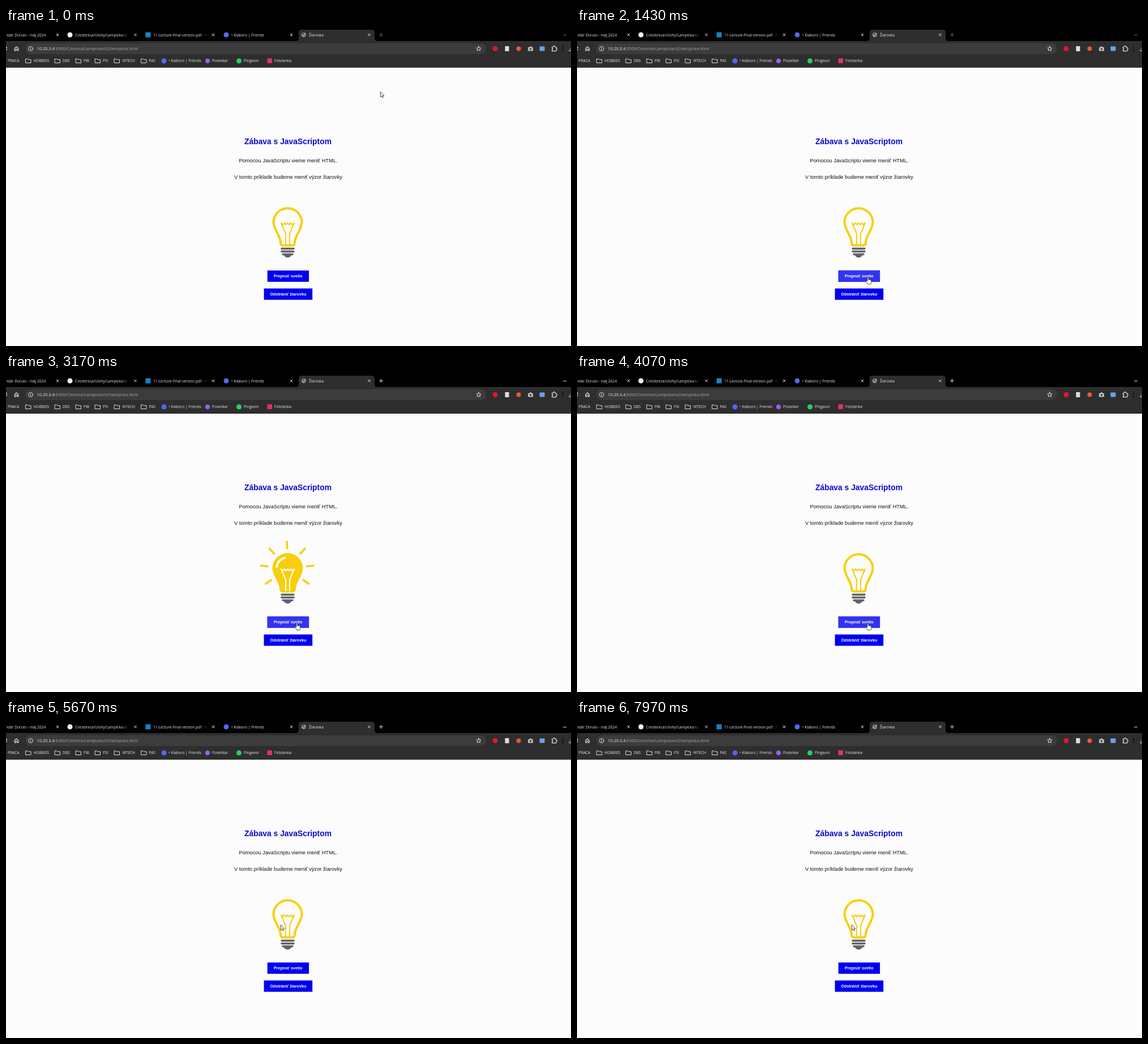
An HTML page that plays this animation: 998x561 px, repeating every 8 s.

```html
<!DOCTYPE html>
<html lang="sk">
<head>
<meta charset="utf-8">
<title>Žiarovka</title>
<style>
  html, body { margin: 0; width: 100%; height: 100%; overflow: hidden; background: #fcfcfd; }
  svg { display: block; }
  .ui { font: 6.6px "Open Sans", sans-serif; fill: #e6e6e6; }
  .url { font-size: 7.4px; fill: #a8a8a8; }
  .page { font: 9.28px "Liberation Sans", sans-serif; fill: #111; text-anchor: middle; }
  .title { font-size: 13.85px; font-weight: bold; fill: #0a0acb; }
  .button { font-size: 7.15px; font-weight: bold; fill: #fff; }
  .line { fill: none; stroke: #dedede; stroke-linecap: round; stroke-linejoin: round; }
  .glass { fill: none; stroke: #f8cf0c; stroke-width: 4; }
  .filament { fill: none; stroke: #f8cf0c; stroke-width: 2; stroke-linejoin: round; }
  .lit .glass { fill: #f8cf0c; }
  .lit .filament { stroke: #fff; }
  .rays { fill: none; stroke: #f8cf0c; stroke-width: 3.6; }

  .pointer, .arrow, .beam, .hand, .hover, .off, .lit, .focus { animation: 8s step-end infinite; }
  .pointer { animation-name: travel; }
  .arrow { animation-name: arrow; }
  .beam { animation-name: beam; }
  .hand, .hover { animation-name: over; }
  .off { animation-name: off; }
  .lit { animation-name: lit; }
  .focus { animation-name: focus; }

  @keyframes travel {
    0% { transform: translate(661px, 112px); }
    1.5% { transform: translate(661px, 112px); animation-timing-function: ease-in; }
    7.9% { transform: translate(583px, 263px); animation-timing-function: ease-out; }
    15.5% { transform: translate(514px, 439px); }
    54% { transform: translate(514px, 439px); animation-timing-function: ease-in-out; }
    62%, 100% { transform: translate(485px, 361px); }
  }
  @keyframes arrow {
    0%, 8.4%, 56.2%, 100% { opacity: 1; }
    7.6%, 13.6% { opacity: 0; }
  }
  @keyframes beam {
    0%, 8.4%, 100% { opacity: 0; }
    7.6% { opacity: 1; }
  }
  @keyframes over {
    0%, 56.2%, 100% { opacity: 0; }
    13.6% { opacity: 1; }
  }
  @keyframes off {
    0%, 40%, 100% { opacity: 1; }
    23% { opacity: 0; }
  }
  @keyframes lit {
    0%, 40%, 100% { opacity: 0; }
    23% { opacity: 1; }
  }
  @keyframes focus {
    0% { opacity: .45; }
    22%, 100% { opacity: 1; }
  }
</style>
</head>
<body>
<svg width="998" height="561" viewBox="0 0 998 561">
  <defs>
    <linearGradient id="fade"><stop stop-opacity="0"/><stop offset="1"/></linearGradient>
    <path id="close" class="line" d="M-2-2 2 2M2-2-2 2"/>
    <path id="folder" class="line" d="M-4.5-3.5h3.2l1.2 1.3h4.6v5.7h-9z"/>
    <path id="glass" d="M489 383.5H506Q509.5 383.5 510 379.5C509.5 366 521.5 358 522.5 343A25 25 0 1 0 472.5 343C473.5 358 485.500 366 485 379.5Q485.5 383.5 489 383.5Z"/>
    <path id="filament" d="M494 383V363L486 344l3.5 3 2.6-3 2.7 3 2.7-3 2.7 3 2.7-3 2.6 3 3.5-3L501 363V383"/>
    <path id="base" fill="#626267" d="M487 387.5h21a1.7 1.7 0 0 1 0 3.5h-21a1.7 1.7 0 0 1 0-3.5zm0 5h21a1.7 1.7 0 0 1 0 3.5h-21a1.7 1.7 0 0 1 0-3.5zm1 5h19q2 1.8-1 3.5h-2q-2 4-6.5 4t-6.5-4h-2q-3-1.7-1-3.5z"/>
  </defs>

  <rect width="998" height="561" fill="#fcfcfd"/>

  <g class="ui">
    <rect width="998" height="24" fill="#000"/>
    <path fill="#2e2e2e" d="M512 23q5 0 5-5V8q0-5 5-5H646q5 0 5 5V18q0 5 5 5z"/>
    <rect y="23" width="998" height="47" fill="#2e2e2e"/>
    <rect x="34" y="27" width="814" height="19" rx="9.5" fill="#3c3c3c"/>

    <text x="-1" y="14.5">ndár Dorulo - máj 2024</text>
    <circle cx="113" cy="12" r="4.5" fill="#f2f2f2"/>
    <text x="122" y="14.5">Cvicebnica/Ulohy/Lampicka/ul</text>
    <rect x="246.5" y="7.5" width="9" height="9" fill="#1683c6"/>
    <text x="260" y="14.5">11-Lecture-Final version.pdf - N</text>
    <path fill="url(#fade)" d="M203 4h15v16h-15z"/>
    <path fill="url(#fade)" d="M342 4h14v16h-14z"/>
    <path fill="#000" d="M218 4h5v16h-5zM356 4h6v16h-6z"/>
    <circle cx="389" cy="12" r="4.5" fill="#5865f2"/>
    <text x="398" y="14.5">• Klaboro | Friends</text>
    <circle cx="526" cy="12" r="4" fill="#9a9da1"/>
    <path fill="#55585c" d="M523 10.5q2-3 4-2.2l-1 2.2 1.5 1-2 2zM527 13l2.5-1q0 2.5-2.5 3.5z"/>
    <text x="535" y="14.5">Žiarovka</text>
    <use href="#close" x="91" y="12"/>
    <use href="#close" x="228.5" y="12"/>
    <use href="#close" x="366" y="12"/>
    <use href="#close" x="504" y="12"/>
    <use href="#close" x="641.5" y="12"/>
    <path class="line focus" d="M659.5 12h6M662.5 9v6M984.5 12.5h5"/>

    <path class="line" stroke-width="1.2" d="M0 33.5h1v2h-2M0 39q1-.5 1.3-1.5M15.2 36 18.5 33l3.3 3v4h-2v-2.7h-2.5V40h-2z"/>
    <circle class="line" cx="43.5" cy="36.5" r="3.8"/>
    <path class="line" d="M43.5 36v2.3M43.5 34.3v.1"/>
    <text class="url" x="54.5" y="39"><tspan fill="#f0f0f0">10.20.3.4</tspan>:8300/Cvicenia/Lampicka/v2/lampicka.html</text>
    <path class="line" d="m835 32.3 1.2 2.7 2.9.3-2.2 1.9.7 2.9-2.6-1.5-2.6 1.5.7-2.9-2.2-1.9 2.9-.3z"/>
    <circle cx="864" cy="36.5" r="4.5" fill="#e0182d"/>
    <rect x="881.5" y="32" width="7" height="9" fill="#dedede"/>
    <circle cx="905.5" cy="36.5" r="4" fill="#ea5933"/>
    <path fill="#b9b9b9" d="M922 34h2l1-1.5h3l1 1.5h2v6.5h-9z"/>
    <circle cx="926.5" cy="37" r="1.8" fill="#4b4b4b"/>
    <rect x="942.5" y="32.5" width="9" height="8" rx="1" fill="#6ba1ec"/>
    <path class="line" stroke-width="1.2" d="M964.5 33.5h2.2q0-1.8 1.5-1.8t1.5 1.8h2v2.2q1.7 0 1.7 1.4t-1.7 1.4v2.2h-7.2v-2.3q1.6 0 1.6-1.3t-1.6-1.3z"/>
    <path stroke="#111" stroke-width="1.5" d="M983.5 31.5v10"/>
    <path class="line" d="M998 40.5h-3v-2M996.5 36l1.5 1.5"/>

    <text x="3" y="60.3">PRACA</text>
    <use href="#folder" x="39.5" y="58"/><text x="48.5" y="60.3">HOBBIES</text>
    <use href="#folder" x="91" y="58"/><text x="100" y="60.3">DBS</text>
    <use href="#folder" x="128" y="58"/><text x="137" y="60.3">PIB</text>
    <use href="#folder" x="162" y="58"/><text x="171" y="60.3">PSI</text>
    <use href="#folder" x="196" y="58"/><text x="205.5" y="60.3">WTECH</text>
    <use href="#folder" x="243.5" y="58"/><text x="252.5" y="60.3">PAS</text>
    <circle cx="279" cy="58" r="4.5" fill="#5865f2"/><text x="287" y="60.3">• Klaboro | Friends</text>
    <circle cx="356" cy="58" r="4.2" fill="#a05cf5"/><text x="364" y="60.3">Posielkar</text>
    <circle cx="411.5" cy="58" r="4.5" fill="#28cf62"/><text x="420" y="60.3">Pingavor</text>
    <rect x="461.5" y="53.5" width="8.5" height="8.5" fill="#df2f78"/><text x="474" y="60.3">Fotolanka</text>
  </g>

  <g class="page">
    <text class="title" x="498" y="205">Zábava s JavaScriptom</text>
    <text x="498.5" y="236.8">Pomocou JavaScriptu vieme meniť HTML.</text>
    <text x="498.5" y="265.8">V tomto príklade budeme meniť výzor žiarovky</text>

    <g class="off">
      <use class="glass" href="#glass"/>
      <use class="filament" href="#filament"/>
      <use href="#base"/>
    </g>
    <g class="lit">
      <path class="rays" d="M496.5 294.5V309M464.5 307l10 11M529 307l-10 11M449 338l14.5 1.5M544.5 338 530 339.5M457.5 371l12-8.5M536 371l-12-8.5"/>
      <use class="glass" href="#glass"/>
      <path fill="none" stroke="#fff" stroke-width="3.5" d="M478 341.5Q479.5 327 494 324"/>
      <use class="filament" href="#filament"/>
      <use href="#base"/>
    </g>

    <path fill="#0000ee" d="M461.7 427.7h73.4v20.1h-73.4zM455.6 459.4h85.6v20.1h-85.6z"/>
    <path class="hover" fill="#3333f1" d="M461.7 427.7h73.4v20.1h-73.4z"/>
    <text class="button" x="498.3" y="440.3">Prepnúť svetlo</text>
    <text class="button" x="498.4" y="472.1">Odstrániť žiarovku</text>
  </g>

  <g class="pointer">
    <path class="arrow" fill="#fff" stroke="#222" stroke-width=".8" d="M.4.4v9.3l2.1-2 1.5 3.3 1.5-.7L4 7.2h2.9z"/>
    <path class="beam" fill="none" stroke="#111" stroke-width=".9" d="M-1.8-4.5q1.8 0 1.8 1v7q0 1-1.8 1M1.8-4.5Q0-4.5 0-3.5v7q0 1 1.8 1"/>
    <path class="hand" fill="#fff" stroke="#222" stroke-width=".8" stroke-linejoin="round" d="M-1 1q0-1.2 1-1.2T1 1v4q1.2-.7 1.7.3 1.2-.6 1.7.4 1.4-.3 1.4 1v2.5q0 2-1.3 3.8H-.4Q-1.5 10.5-3 8.2-3.6 7-2.7 6.6T-1 7.6z"/>
  </g>
</svg>
</body>
</html>
```
